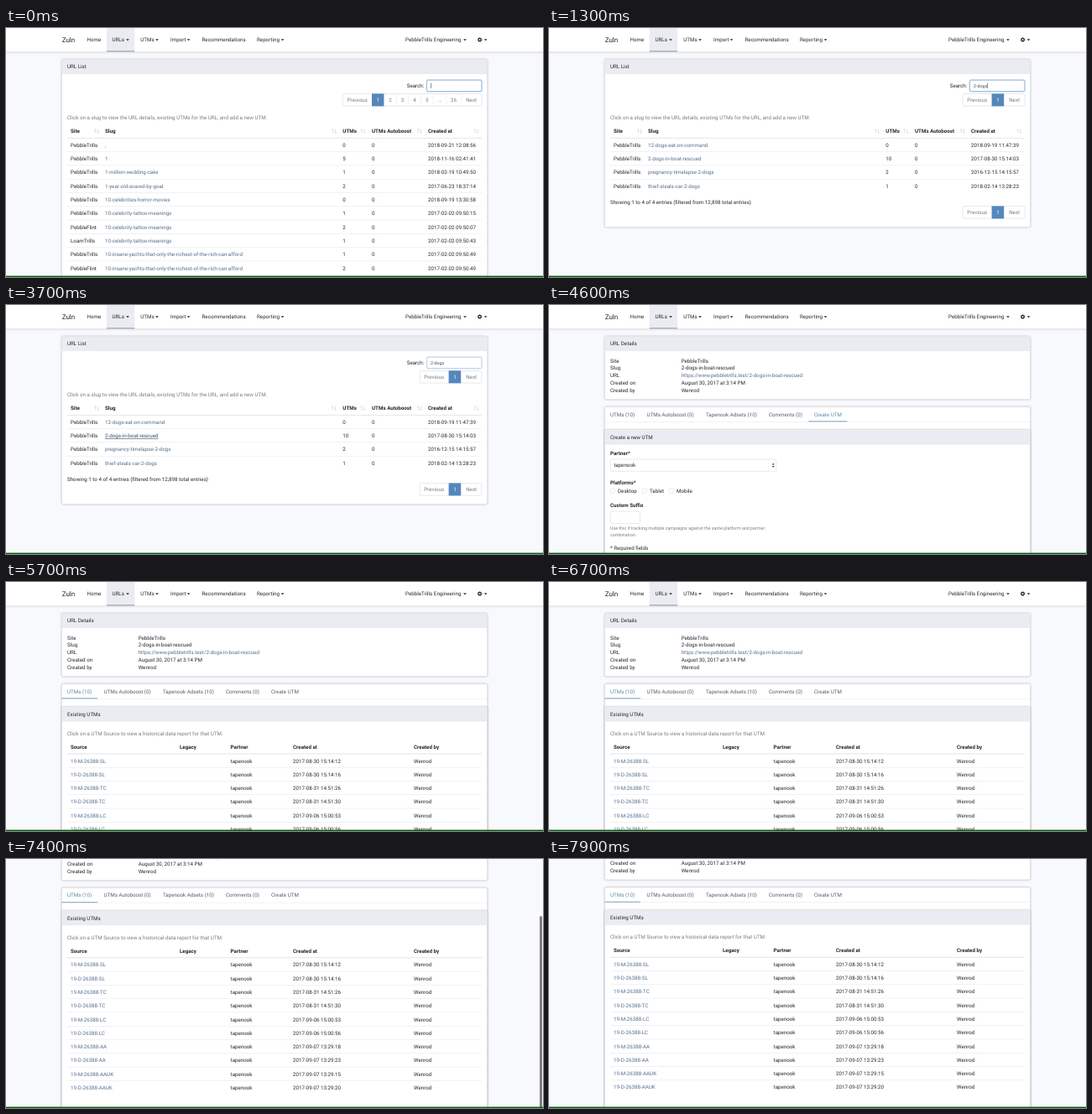
Recreate the animation shown at these times as an HTML page. Size 640 px wide and 297 px high, loop 8000 ms.

```html
<!DOCTYPE html>
<html lang="en">
<head>
<meta charset="utf-8">
<title>URL admin</title>
<style>
  html, body { margin: 0; width: 100%; height: 100%; overflow: hidden; background: #f8f9fc; }
  svg { display: block; width: 100vw; height: 100vh; }
  text { font: 6.222px Roboto, sans-serif; fill: #24282c; white-space: pre; text-rendering: geometricPrecision; }
  .bold { font-weight: 700; }
  .link { fill: #55708d; }
  .hover { fill: #34506c; text-decoration: underline; }
  .grey { fill: #777b80; }
  .tab { fill: #585d63; }
  .active { fill: #5985a5; }
  .white { fill: #fff; }
  .brand { font-size: 8px; }
  .small { font-size: 5.33px; fill: #777b80; }
  .input { font-size: 5.33px; fill: #495057; }
  .mid { text-anchor: middle; }
  .card { fill: #fff; stroke: #d9dbe0; stroke-width: .45; filter: drop-shadow(0 .5px 1px rgba(0, 0, 0, .28)); }
  .nav { fill: #fff; filter: drop-shadow(0 .6px 1.8px rgba(0, 0, 0, .25)); }
</style>
</head>
<body>
<svg id="stage" viewBox="0 0 640 297"></svg>
<script>
const LOOP = 8000, STEP = 100;
const SITE = 'PebbleTrills', PARTNER = 'tapenook', AUTHOR = 'Wenrod';
const SLUG = '2-dogs-in-boat-rescued';
const stage = document.getElementById('stage');
const clamp = v => Math.max(0, Math.min(1, v));

// y is the middle of the capitals
const text = (x, y, str, cls = '') =>
  `<text x="${x}" y="${y + (cls.includes('brand') ? 2.8 : 2.2)}" class="${cls}">${str}</text>`;
const rect = (x, y, w, h, attrs) => `<rect x="${x}" y="${y}" width="${w}" height="${h}" ${attrs}/>`;
const path = (d, attrs) => `<path d="${d}" ${attrs}/>`;
const line = (y, w = .45, x1 = 73, x2 = 567) => rect(x1, y - w / 2, x2 - x1, w, 'fill="#dee2e6"');
const box = (x, y, w, h, r = 1.8) => rect(x, y, w, h, `rx="${r}" fill="#fff" stroke="#ced2d8" stroke-width=".5"`);
const caret = x => path(`M${x - 1.85} 13.3h3.7l-1.85 1.9z`, 'fill="#24282c"');
const sortIcon = (x, y) => path(
  `M${x - 1.6} ${y + 2.4}v-4.8m-1.1 1.3l1.1-1.3 1.1 1.3M${x + 1.6} ${y - 2.4}v4.8m-1.1-1.3l1.1 1.3 1.1-1.3`,
  'fill="none" stroke="#c3c6ca" stroke-width=".5"');

const panel = (y, h) => rect(66.5, y, 507, h, 'rx="1.8" class="card"');
const card = (y, h, title) => panel(y, h) +
  path(`M66.7 ${y + 17.5}v-15.7q0-1.6 1.6-1.6h503.4q1.6 0 1.6 1.6v15.7z`, 'fill="#ebecf1"') +
  text(73, y + 8.7, title);

function navbar() {
  const items = [[96.5, 'Home'], [126.5, 'URLs', 145], [160.3, 'UTMs', 180], [196, 'Import', 217.6],
    [233.5, 'Recommendations'], [299, 'Reporting', 329.6], [476, SITE + ' Engineering', 547]];
  return rect(-5, -5, 650, 33.3, 'class="nav"') +
    rect(119.8, 0, 33.4, 28.3, 'fill="#ebecf1"') + rect(119.8, 27.3, 33.4, 1, 'fill="#8d93a5"') +
    text(66.7, 14, 'Zuln', 'brand') +
    items.map(([x, label, arrow]) => text(x, 14, label) + (arrow ? caret(arrow) : '')).join('') +
    '<g fill="none" stroke="#24282c"><circle cx="564.6" cy="14" r="1.6" stroke-width="1.3"/>' +
    '<circle cx="564.6" cy="14" r="2.4" stroke-width=".8" stroke-dasharray=".95 .935"/></g>' + caret(571.6);
}

// cols: [x, heading, sort icon x]; linkCol holds the links
function table(y, cols, rows, linkCol, hoverRow = -1) {
  const head = cols.map(([x, name, icon]) => text(x, y, name, 'bold') + (icon ? sortIcon(icon, y) : '')).join('');
  const body = rows.map((row, i) => {
    const top = y + 8.3 + i * 16.29;
    return line(top, i ? .45 : .9) + row.map((cell, c) => text(cols[c][0], top + 8.4, cell,
      c !== linkCol ? '' : i === hoverRow ? 'hover' : 'link')).join('');
  }).join('');
  return head + body;
}

function pager(y, labels, edges) {
  const h = 14.6, left = edges[0];
  return box(left, y, 567 - left, h) + labels.map((label, i) => {
    const x = edges[i], w = edges[i + 1] - x, on = label === '1';
    return (on ? rect(x, y - .2, w, h + .4, 'fill="#5487bd"')
      : i ? rect(x - .2, y, .45, h, 'fill="#dee2e6"') : '') +
      text(x + w / 2, y + 7.3, label, 'mid ' + (on ? 'white' : 'grey'));
  }).join('');
}

const listCols = [[77, 'Site', 108], [118, 'Slug', 391], [401.3, 'UTMs', 425.5],
  [436, 'UTMs Autoboost', 493], [503, 'Created at', 560.5]];
const tattoo = '10-celebrity-tattoo-meanings';
const yachts = '10-insane-yachts-that-only-the-richest-of-the-rich-can-afford';
const FLINT = 'PebbleFlint', LOAM = 'LoamTrills';
const allRows = [
  [SITE, ',', 0, 0, '2018-09-21 12:08:56'],
  [SITE, '1', 5, 0, '2018-11-16 02:41:41'],
  [SITE, '1-million-wedding-cake', 1, 0, '2018-02-19 10:49:50'],
  [SITE, '1-year-old-scared-by-goat', 2, 0, '2017-06-23 18:37:14'],
  [SITE, '10-celebrities-horror-movies', 0, 0, '2018-09-19 13:30:58'],
  [SITE, tattoo, 1, 0, '2017-02-02 09:50:15'],
  [FLINT, tattoo, 2, 0, '2017-02-02 09:50:07'],
  [LOAM, tattoo, 1, 0, '2017-02-02 09:50:43'],
  [SITE, yachts, 1, 0, '2017-02-02 09:50:49'],
  [FLINT, yachts, 2, 0, '2017-02-02 09:50:49'],
];
const foundRows = [
  [SITE, '12-dogs-eat-on-command', 0, 0, '2018-09-19 11:47:39'],
  [SITE, SLUG, 10, 0, '2017-08-30 15:14:03'],
  [SITE, 'pregnancy-timelapse-2-dogs', 2, 0, '2016-12-15 14:15:57'],
  [SITE, 'thief-steals-car-2-dogs', 1, 0, '2018-02-14 13:28:23'],
];

function searchBox(t) {
  const typed = t >= 1200, focus = clamp((3800 - t) / 200);
  const caretOn = t < 3600 && (t < 1800 || t >= 2300 && t < 2800 || t >= 3300);
  return text(477.7, 68.7, 'Search:') + box(501.6, 62.3, 65.2, 13.2) +
    `<g opacity="${focus}">` +
    rect(501, 61.7, 66.4, 14.4, 'rx="2.4" fill="none" stroke="#cfe0f4" stroke-width="1.2"') +
    rect(501.6, 62.3, 65.2, 13.2, 'rx="1.8" fill="#fff" stroke="#6f9cce" stroke-width=".6"') + '</g>' +
    (typed ? text(506, 68.5, '2-dogs', 'input') : '') +
    (caretOn ? rect(typed ? 522.4 : 506.2, 65.6, .55, 6.4, 'fill="#333"') : '');
}

function listPage(t) {
  const found = t >= 1300;
  const shortPager = y => pager(y, ['Previous', '1', 'Next'], [493, 527.6, 542.2, 567]);
  return card(37.5, found ? 200 : 300, 'URL List') + searchBox(t) +
    text(73, 107, 'Click on a slug to view the URL details, existing UTMs for the URL, and add a new UTM.', 'grey') +
    table(123, listCols, found ? foundRows : allRows, 1, t >= 3200 ? 1 : -1) +
    (found
      ? shortPager(78.5) + shortPager(212.6) +
        text(73, 207.5, 'Showing 1 to 4 of 4 entries (filtered from 12,898 total entries)')
      : pager(78.5, ['Previous', '1', '2', '3', '4', '5', '…', '26', 'Next'],
        [401.3, 436, 450.6, 465.2, 479.8, 494.4, 509, 525, 542.2, 567]));
}

function details() {
  const facts = [['Site', SITE], ['Slug', SLUG], ['URL', 'https://www.pebbletrills.test/' + SLUG],
    ['Created on', 'August 30, 2017 at 3:14 PM'], ['Created by', AUTHOR]];
  return card(37.5, 75, 'URL Details') + facts.map(([name, value], i) =>
    text(73, 66.5 + i * 8.75, name) + text(157.7, 66.5 + i * 8.75, value, i === 2 ? 'link' : '')).join('');
}

function tabs(active) {
  const items = [[73, 'UTMs (10)', 109], [116.6, 'UTMs Autoboost (0)', 179], [187, 'Tapenook Adsets (10)', 254],
    [262, 'Comments (0)', 308], [316, 'Create UTM', 355.5]];
  const [x, , end] = items[active];
  return panel(121.6, 320) + line(139.2, .45, 66.5, 573.5) +
    items.map(([left, label], i) => text(left, 130.3, label, i === active ? 'active' : 'tab')).join('') +
    rect(x - 6.8, 138.4, end - x + 6.8, .9, 'fill="#6f9bbd"');
}

function createForm() {
  const checks = [[73.4, 'Desktop'], [111.4, 'Tablet'], [143.4, 'Mobile']];
  return card(149, 300, 'Create a new UTM') +
    text(73, 177, 'Partner*', 'bold') + box(73.2, 184, 197.6, 14.3) + text(77.2, 191.2, PARTNER) +
    path('M265.9 190.5l1.4-2 1.4 2zM265.9 191.9l1.4 2 1.4-2z', 'fill="#343a40"') +
    text(73, 212, 'Platforms*', 'bold') +
    checks.map(([x, label]) => box(x, 219, 5, 5, .9) + text(x + 8.6, 221.6, label)).join('') +
    text(73, 239, 'Custom Suffix', 'bold') + box(73.2, 246.2, 35.2, 14.4) +
    text(73, 265.4, 'Use this if tracking multiple campaigns against the same platform and partner', 'small') +
    text(73, 274.2, 'combination.', 'small') + text(73, 289.5, '* Required fields');
}

const utmCols = [[77, 'Source'], [207, 'Legacy'], [267.6, 'Partner'], [342, 'Created at'], [486, 'Created by']];
const stamps = ['08-30 15:14:12', '08-30 15:14:16', '08-31 14:51:26', '08-31 14:51:30', '09-06 15:00:53',
  '09-06 15:00:56', '09-07 13:29:18', '09-07 13:29:23', '09-07 13:29:15', '09-07 13:29:20'];
const utmRows = stamps.map((stamp, i) =>
  [`19-${'MD'[i % 2]}-26388-${['SL', 'TC', 'LC', 'AA', 'AAUK'][i >> 1]}`, '', PARTNER, '2017-' + stamp, AUTHOR]);

const utmList = () => card(149, 300, 'Existing UTMs') +
  text(73, 180.8, 'Click on a UTM Source to view a historical data report for that UTM.', 'grey') +
  table(196.6, utmCols, utmRows, 0);

function draw(t) {
  const scroll = 87.7 * (1 - (1 - clamp((t - 6717) / 743)) ** 2);
  const page = t < 4600 ? listPage(t)
    : details() + (t < 5600 ? tabs(4) + createForm() : tabs(0) + utmList());
  const thumbAlpha = scroll ? clamp((7900 - t) / 400) : 0;
  stage.innerHTML = rect(0, 0, 640, 297, 'fill="#f8f9fc"') +
    `<g transform="translate(0 ${-scroll})">${navbar()}${page}</g>` +
    rect(636, scroll * .77 + .8, 3, 240, `rx="1.5" fill="#7d7d7f" opacity="${thumbAlpha}"`) +
    rect(0, 295.6, 640, 1.4, 'fill="#00600a"');
}

let last = -1;
const start = performance.now();
function tick() {
  const t = Math.floor((performance.now() - start) % LOOP / STEP) * STEP;
  if (t !== last) draw(last = t);
  requestAnimationFrame(tick);
}
tick();
</script>
</body>
</html>
```
